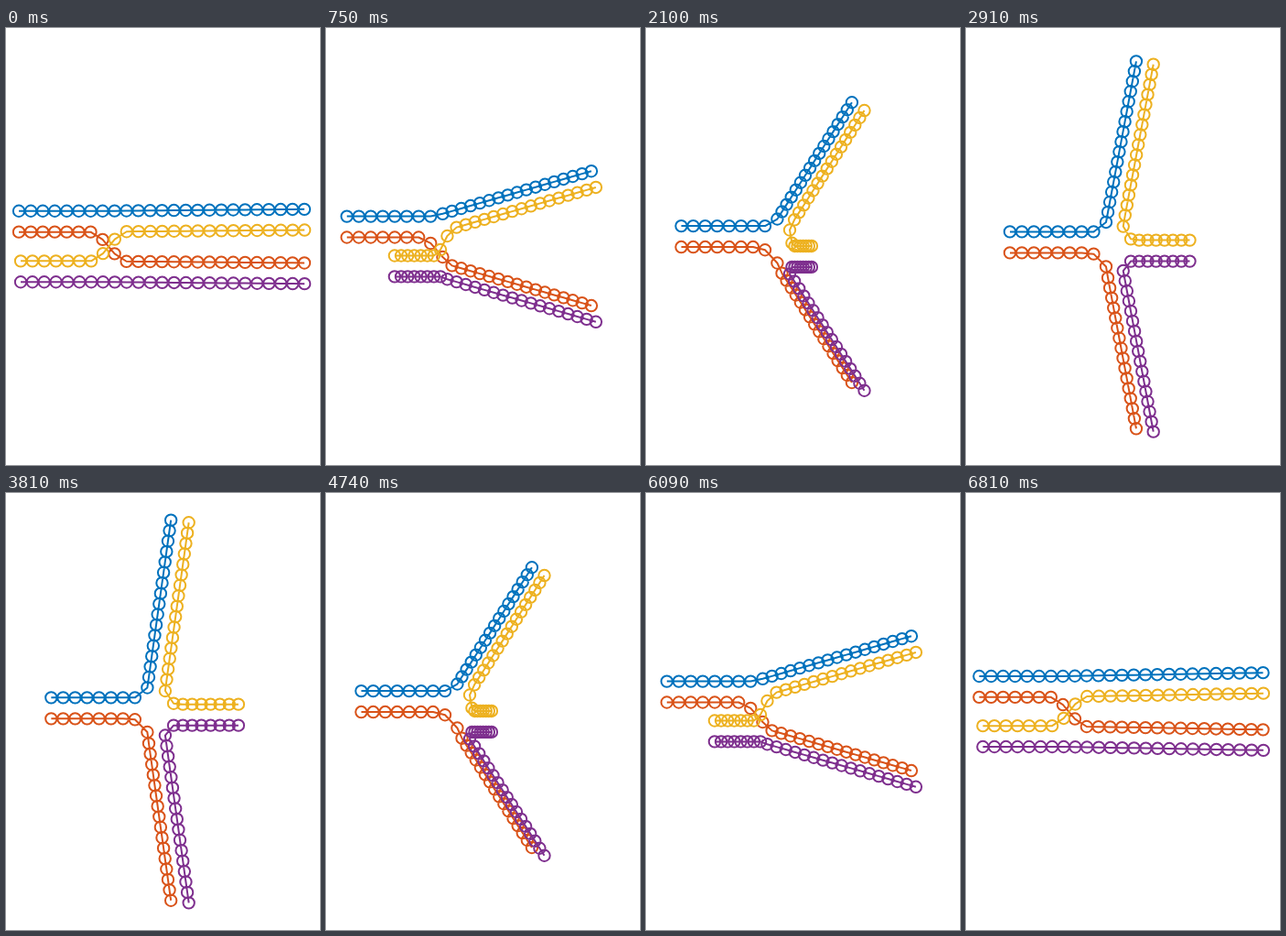
Write an HTML page with a canvas that moves like this. It is 343 px wide and 477 px high and loops after 6840 ms.

```html
<!DOCTYPE html>
<html>
<head>
<meta charset="utf-8">
<title>Strand exchange</title>
<style>
  html, body { margin: 0; width: 100%; height: 100%; overflow: hidden; background: #fff; }
  canvas { display: block; filter: blur(0.5px); }
</style>
</head>
<body>
<canvas id="stage" width="343" height="477"></canvas>
<script>
const ctx = document.getElementById('stage').getContext('2d');
const FRAME = 30, HALF = 114;
const BEADS = 25, CORNER = 8, RADIUS = 6.2;
const GAP = 13.07, MID = 238.5, INNER = 16.1, OUTER = 39;

// arm: side the horizontal arm ends on (-1 left, 1 right)
// end: where the long arm points (-1 up, 1 down)
const strands = [
  { color: '#0072bd', arm: -1, end: -1, cross: false },
  { color: '#d95319', arm: -1, end: 1, cross: true },
  { color: '#edb120', arm: 1, end: -1, cross: true },
  { color: '#7e2f8e', arm: 1, end: 1, cross: false }
];

const mix = (a, b, u) => a + (b - a) * u;
const smooth = u => u * u * (3 - 2 * u);
const clamp = u => Math.min(1, Math.max(0, u));

// Four parallel rows; the inner two swap places just before the corner bead.
function closed({ end, cross }, i) {
  const swap = smooth(clamp((i - CORNER + 2) / 3));
  const offset = cross ? INNER * mix(-1, 1, swap) : OUTER;
  return [13.7 + GAP * i, MID + end * offset];
}

// A cross: short horizontal arms, then long vertical ones.
function opened({ arm, end }, i) {
  if (i < CORNER) {
    const x = arm < 0 ? 53.9 + GAP * i : 284.5 - GAP * i;
    return [x, MID + arm * 0.6 + end * 11.5];
  }
  const j = i - CORNER;
  return [170 + arm * 11 + 0.15 * j, MID + end * (24.4 + 12.88 * j)];
}

function drawStrand(strand, open) {
  const beads = Array.from({ length: BEADS }, (_, i) => {
    const a = closed(strand, i), b = opened(strand, i);
    return [mix(a[0], b[0], open), mix(a[1], b[1], open)];
  });
  ctx.strokeStyle = strand.color;
  ctx.beginPath();
  beads.forEach(([x, y]) => ctx.lineTo(x, y));
  for (const [x, y] of beads) {
    ctx.moveTo(x + RADIUS, y);
    ctx.arc(x, y, RADIUS, 0, Math.PI * 2);
  }
  ctx.stroke();
}

const start = performance.now();

function draw(now) {
  const step = Math.floor(Math.max(0, now - start) / FRAME) % (2 * HALF);
  const open = (Math.min(step, 2 * HALF - step) + 1) / (HALF + 1);
  ctx.clearRect(0, 0, 343, 477);
  ctx.lineWidth = 2;
  ctx.lineJoin = 'round';
  strands.forEach(s => drawStrand(s, open));
  requestAnimationFrame(draw);
}
draw(start);
</script>
</body>
</html>
```
